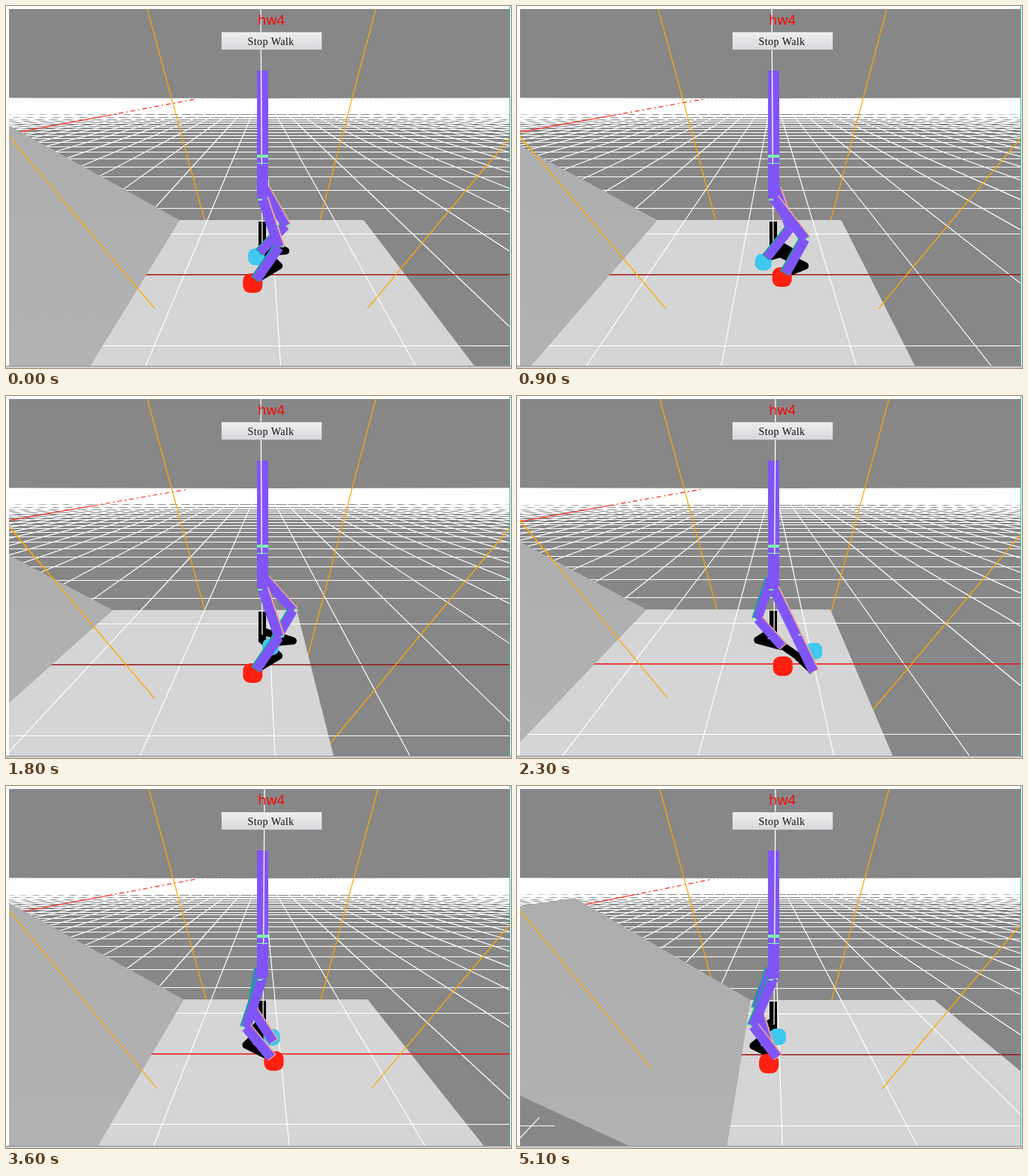
An HTML page with a canvas for the animation above (5200 ms loop, 672 by 482 pixels).

```html
<!DOCTYPE html>
<html>
<head>
<meta charset="utf-8">
<style>
  html, body { margin: 0; width: 100%; height: 100%; overflow: hidden; background: #fff; }
  canvas { display: block; }
</style>
</head>
<body>
<canvas id="stage" width="672" height="482"></canvas>
<script>
const ctx = document.getElementById('stage').getContext('2d');
const LOOP = 5200, TURN = 1.85, PERIOD = 1.8;
const HORIZON = 112, VANISH_X = 341, BOTTOM = 479, BOX_Y = 285;
const PURPLE = '#8055f8', RED = '#ff2010', CYAN = '#40c8f0';
const ORANGE = '#ffa800', MINT = '#80f0b0', WHITE = '#fff';

function rect(color, x, y, w, h) {
  ctx.fillStyle = color;
  ctx.fillRect(x, y, w, h);
}

function trace(points) {
  ctx.beginPath();
  for (const [x, y] of points) ctx.lineTo(x, y);
}

function poly(color, ...points) {
  ctx.fillStyle = color;
  trace(points);
  ctx.fill();
}

function line(color, width, ...points) {
  ctx.strokeStyle = color;
  ctx.lineWidth = width;
  trace(points);
  ctx.stroke();
}

// Point on the line a-b at height y
const atY = ([ax, ay], [bx, by], y) => [ax + (bx - ax) * (y - ay) / (by - ay), y];

function drawGrid(offset, ground, axisColor) {
  for (let k = -66; k <= 66; k++) {
    const end = [186 + offset + 179.5 * k, ground(BOTTOM)];
    const vanish = [VANISH_X, HORIZON];
    line(WHITE, 1.2, atY(vanish, end, 123), atY(vanish, end, BOTTOM));
  }
  for (let n = -1; n <= 75; n++) {
    const y = Math.floor(ground(HORIZON + 878 / (n + 3.58)));
    if (n) rect(WHITE, 4, y, 666, 1);
    else rect(axisColor, 4, y, 666, 1.5);
  }
}

function drawGround(t, back, bob) {
  const ground = y => HORIZON + (y - HORIZON) * (1 + bob / 220);
  const left = back ? 172 + 49.5 * (t - 2.3) : 231 - 49.5 * t;
  const shift = left - 231, slide = shift * 2.1;
  const topLeft = [left, ground(BOX_Y)], topRight = [left + 245, ground(BOX_Y)];
  const lowLeft = atY(topLeft, [112 + slide, ground(BOTTOM)], BOTTOM);
  const lowRight = atY(topRight, [623 + slide, ground(BOTTOM)], BOTTOM);
  const box = [topLeft, topRight, lowRight, lowLeft];
  const axisColor = bob < -0.5 ? '#f01010' : '#981818';

  drawGrid(slide, ground, axisColor);

  // Distant axis breaks up towards the horizon
  const near = [22 + shift * 0.29, 167], far = [252 + shift * 0.1, 124];
  const middle = atY(near, far, 146);
  line(RED, 1.2, atY(near, far, 172), middle);
  ctx.setLineDash([6, 4, 2, 4]);
  line(RED, 1.2, middle, far);
  ctx.setLineDash([]);

  // Light frustum, partly hidden by the blocks
  const upper = back ? [[[190, 4], [266, 284]], [[495, 4], [419, 284]]]
                     : [[[188, 4], [264, 284]], [[492, 4], [418, 284]]];
  const lower = back ? [[[4, 166], [201, 403]], [[670, 185], [486, 403]]]
                     : [[[4, 174], [198, 403]], [[670, 176], [481, 403]]];
  for (const [a, b] of [...upper, ...lower]) line(ORANGE, 1.2, a, atY(a, b, BOTTOM));

  poly('#d5d5d5', ...box);
  ctx.save();
  trace(box);
  ctx.clip();
  drawGrid(slide, ground, axisColor);
  const [[a, b], [c, d]] = lower;
  line(ORANGE, 1.2, c, atY(c, d, 403 + bob));
  ctx.restore();

  const corner = [77 + (shift - 80) * 1.136, 149];
  const front = 150 + (shift - 80) * 2.57;
  const edgeY = BOTTOM - (front - 4) * 0.46;
  poly('#888', [4, edgeY], [front, BOTTOM], [front - 50, BOTTOM], [4, edgeY + 15]);
  const shade = ctx.createLinearGradient(0, 150, 0, BOTTOM);
  shade.addColorStop(0, '#adadad');
  shade.addColorStop(1, '#b2b2b2');
  poly(shade, corner, topLeft, lowLeft, [front, BOTTOM],
       [front - 600, BOTTOM - 276], [corner[0] - 200, 179]);

  const pierce = 403 + bob - Math.max(0, left - 267) * 0.62;
  line(ORANGE, 1.2, a, atY(a, b, pierce));
}

function bendKnee(hip, ankle, thigh, shin, side) {
  const dx = ankle[0] - hip[0], dy = ankle[1] - hip[1], d = Math.hypot(dx, dy);
  const along = (d * d + thigh * thigh - shin * shin) / (2 * d);
  const out = side * Math.sqrt(Math.max(0, thigh * thigh - along * along));
  return [hip[0] + (dx * along + dy * out) / d, hip[1] + (dy * along - dx * out) / d];
}

function limb(a, b, width) {
  const right = b[0] > a[0], off = right ? 2 : -2;
  line(right ? '#f0a890' : '#10a890', width, [a[0] + off, a[1]], [b[0] + off, b[1]]);
  line(PURPLE, width, a, b);
}

function drawLeg({ hip, knee, ankle }, width) {
  limb(hip, knee, width);
  limb(knee, ankle, width);
  rect(MINT, knee[0] + Math.sign(knee[0] - hip[0]) * 5 - 2, knee[1] - 2, 4, 2);
}

function drawFoot(color, [x, y], r) {
  ctx.fillStyle = color;
  ctx.beginPath();
  ctx.roundRect(x - r, y - r, r * 2, r * 2, r * 0.75);
  ctx.fill();
}

function footTargets(t, back, bob) {
  const angle = 2 * Math.PI * (t - (back ? 4.2 : 0)) / PERIOD;
  const lift = Math.cos(angle);
  if (back) {
    const swing = 22 * Math.sin(angle - 0.27);
    const drift = Math.max(0, 67 - 30 * (t - 2.3));
    return { red: [341 - swing, 365 - 4.5 * lift + bob],
             cyan: [341 + swing + drift, 337.5 + 3.5 * lift + bob] };
  }
  const swing = 28 * Math.sin(angle + 0.45);
  return { red: [340.5 - swing, 365 + 4 * lift],
           cyan: [340 + swing - 19 * Math.max(0, 1 - t / 0.8), 337.5 - 3.5 * lift] };
}

function drawWalker(t, back, bob) {
  const { red, cyan } = footTargets(t, back, bob);
  const side = back ? -1 : 1;
  const leg = (hip, ankle, thigh, shin) =>
    ({ hip, ankle, knee: bendKnee(hip, ankle, thigh, shin, side) });
  const near = leg([341, 256], back ? [cyan[0] - 1, cyan[1] + 27] : [red[0] + 5, red[1] - 5], 69, 52);
  const far = leg([341 + side * 3, 243], back ? [red[0] - 1, red[1] - 26] : [cyan[0] + 5, cyan[1] - 6], 57, 49);

  // Shadow on the floor
  line('#000', 10, [341, 287 + bob], [341, 328 + bob]);
  ctx.lineJoin = 'round';
  line('#000', 10, [341, 325 + bob], [near.knee[0], 346 + bob], near.ankle);
  line('#000', 10, [341, 313 + bob], [far.knee[0], 326 + bob], far.ankle);
  ctx.lineJoin = 'miter';

  rect(PURPLE, 334, 86, 15, 170);
  line(WHITE, 1.3, [back ? 344 : 339, 4], [back ? 342 : 341, 318]);
  rect(MINT, 334, 198, 15, 4);
  rect(MINT, 334, 209, 15, 1);

  drawFoot(CYAN, cyan, 11);
  drawLeg(far, 12);
  rect(PURPLE, 334, 211, 15, 45);
  drawFoot(RED, red, 13);
  drawLeg(near, 13);
  rect(MINT, 335, 257, 6, 2);
}

function drawPanel(hover) {
  ctx.textAlign = 'center';
  ctx.fillStyle = '#ff0000';
  ctx.font = '18px "Open Sans", sans-serif';
  ctx.fillText('hw4', 353, 25);

  if (hover) {
    rect('#2aa0e0', 286, 34, 135, 25);
    rect('#a8f4ff', 287, 35, 133, 23);
  } else {
    const face = ctx.createLinearGradient(0, 35, 0, 58);
    face.addColorStop(0, '#efefef');
    face.addColorStop(1, '#d8d8dc');
    rect('#a8a8a8', 286.5, 34.5, 134, 24);
    rect(face, 287, 35, 133, 23);
  }
  ctx.fillStyle = '#111';
  ctx.font = '14px "Liberation Serif", serif';
  ctx.letterSpacing = '0.4px';
  ctx.fillText('Stop Walk', 352.5, 52);
  ctx.letterSpacing = '0px';
}

function draw(t) {
  const back = t > TURN;
  const bob = back ? -3 * Math.exp(-(((t - 2.95) / 0.65) ** 2)) : 0;
  rect(WHITE, 0, 0, 672, 482);
  ctx.save();
  ctx.beginPath();
  ctx.rect(4, 4, 666, 475);
  ctx.clip();
  rect('#878787', 4, 4, 666, 475);
  drawGround(t, back, bob);
  drawWalker(t, back, bob);
  ctx.restore();
  drawPanel(t > 3.95 && t < 4.55);
  rect('#30c0c0', 670, 0, 1, 480);
  rect('#909090', 0, 479, 672, 1);
  rect('#d0d0d0', 0, 480, 672, 2);
}

function frame() {
  draw(Math.floor(performance.now() % LOOP / 100) / 10);
  requestAnimationFrame(frame);
}
frame();
</script>
</body>
</html>
```
